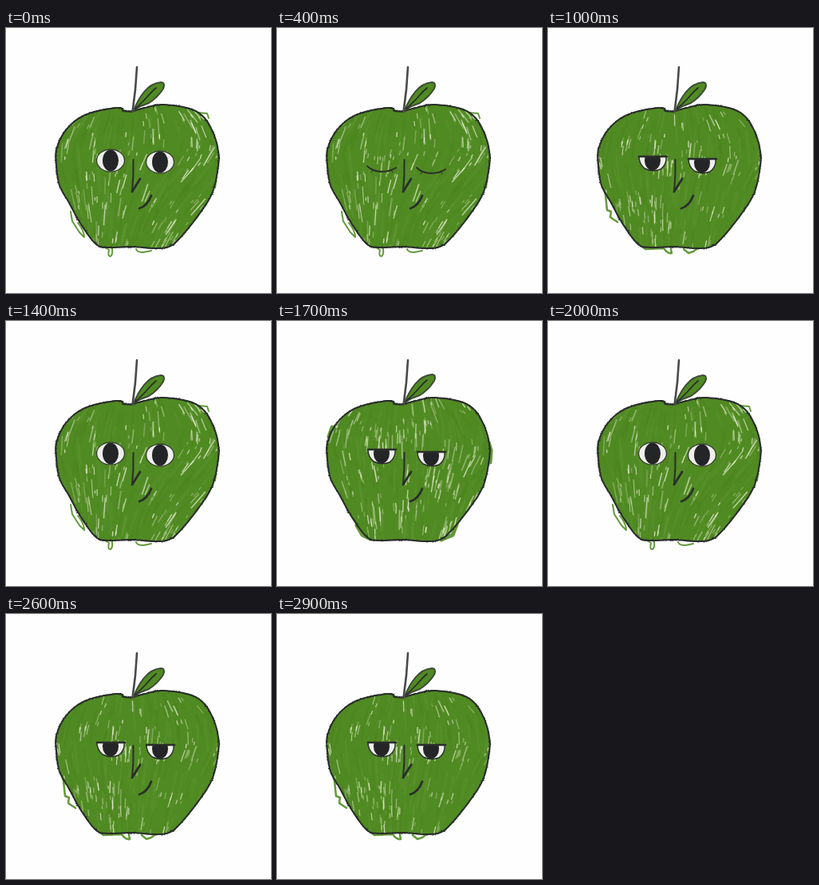
An HTML page with a canvas for the animation above (3000 ms loop, 332x332 px).

```html
<!DOCTYPE html>
<html lang="en">
<head>
<meta charset="utf-8">
<title>Blinking apple</title>
<style>
html, body { margin: 0; width: 100%; height: 100%; overflow: hidden; background: #fefefe; }
canvas { display: block; width: 332px; height: 332px; }
</style>
</head>
<body>
<canvas id="stage" width="332" height="332"></canvas>
<script>
const ctx = document.getElementById('stage').getContext('2d');
const INK = '#2a2e2b', GREEN = '#508a22', WHITE = '#efefec', PUPIL = '#242527';
const STEP = 100, LOOP = 3000;

// Fill drawing (A, B, C) and eyes (O open, H half, C closed) for each 100 ms step
const POSES = ('AO AO AO CH AC BH BH AC CH AC BH AO CH BH AO ' +
  'CH AC CH BH BH AO CH AC BH CH AC BH AO AC BH').split(' ');

const BODY = [[158,104],[149,104],[142,100],[124,102],[104,107],[87,116],[72,132],[63,153],
  [63,172],[67,197],[79,219],[94,246],[112,270],[127,275],[158,274],[184,276],
  [204,274],[219,262],[243,232],[259,205],[266,172],[266,155],[261,135],
  [249,113],[230,101],[196,96],[174,100]];

// lean: sideways slope of the crayon marks in the lower half
const FILLS = {
  A: { seed: 11, count: 65, long: 24, lean: x => (x - 118) / 135, tail: 2, tails: [
    'M81 230L83 242L92 256L98 262Q98 254 90 244',
    'M124 275L129 278Q127 286 131 286Q134 284 133 276',
    'M163 277Q164 281 172 281L182 279', 'M240 106L252 107L254 113', 'M266 170L262 200'] },
  B: { seed: 37, count: 65, long: 16, lean: x => .05 + (x - 150) / 270, tail: 2.5, tails: [
    'M82 126L70 135L75 134L68 150', 'M66 188L72 209L74 228L79 230L78 237L87 243',
    'M116 272L122 277L145 276Q150 283 155 282L154 277', 'M170 277L176 282L182 280L186 277'] },
  C: { seed: 73, count: 85, long: 22, lean: x => (x - 150) / 230, tail: 5, tails: [
    'M265 152L268 162L267 177', 'M100 256L107 268L117 273',
    'M206 274L220 268L225 255', 'M69 133L65 145'] }
};

function random(seed) {
  return () => {
    seed = (seed + 0x6D2B79F5) | 0;
    let t = Math.imul(seed ^ seed >>> 15, 1 | seed);
    t = t + Math.imul(t ^ t >>> 7, 61 | t) ^ t;
    return ((t ^ t >>> 14) >>> 0) / 4294967296;
  };
}

// Closed Catmull-Rom curve, sampled
function curve(points, steps = 12) {
  const n = points.length, out = [];
  points.forEach((b, i) => {
    const a = points[(i + n - 1) % n], c = points[(i + 1) % n], d = points[(i + 2) % n];
    for (let k = 0; k < steps; k++) {
      const t = k / steps;
      out.push([0, 1].map(j => b[j] + .5 * t * (c[j] - a[j] +
        t * (2 * a[j] - 5 * b[j] + 4 * c[j] - d[j] + t * (3 * (b[j] - c[j]) + d[j] - a[j])))));
    }
  });
  return out;
}

const edge = curve(BODY);
const body = new Path2D('M' + edge.map(p => p.join(' ')).join('L') + 'Z');

function line(d, width = 2, color = INK) {
  ctx.strokeStyle = color;
  ctx.lineWidth = width;
  ctx.stroke(typeof d === 'string' ? new Path2D(d) : d);
}

function shape(d, color) {
  ctx.fillStyle = color;
  ctx.fill(typeof d === 'string' ? new Path2D(d) : d);
}

function oval(x, y, rx, ry, color) {
  ctx.beginPath();
  ctx.ellipse(x, y, rx, ry, 0, 0, Math.PI * 2);
  ctx.fillStyle = color;
  ctx.fill();
}

function drawFill({ seed, count, long, lean, tail, tails }) {
  const rnd = random(seed);
  const mark = (x, y, len, width, color) => {
    // Marks follow the lobes at the top and the hatching below
    const low = Math.min(1, Math.max(0, (y - 115) / 60));
    const a = Math.atan((160 - x) / 100 * (1 - low) + lean(x) * low) + (rnd() - .5) * .2;
    const dx = Math.sin(a) * len, dy = -Math.cos(a) * len;
    line(`M${x - dx / 2} ${y - dy / 2}q${dx / 2 + rnd() - .5} ${dy / 2} ${dx} ${dy}`, width, color);
  };
  const spot = () => [62 + rnd() * 206, 102 + rnd() * 172];
  tails.forEach(d => line(d, tail, '#639a3a'));
  shape(body, GREEN);
  ctx.save();
  ctx.clip(body);
  for (let i = 0; i < 160; i++) {
    mark(...spot(), 12 + rnd() * 28, 3, i % 2 ? 'rgba(66,122,24,.18)' : 'rgba(112,160,70,.16)');
  }
  for (let i = 0; i < count; i++) {
    const [x, y] = spot();
    for (let k = 0; k < 3; k++) {
      const strong = rnd(), len = 3 + rnd() ** 2 * long;
      const mx = x + (rnd() - .5) * 14, my = y + (rnd() - .5) * 18;
      mark(mx, my, len, 1.8, 'rgba(214,228,186,.18)');
      mark(mx, my, len, .6 + strong * .7, `rgba(240,246,222,${.2 + strong * .5})`);
    }
  }
  ctx.restore();
}

// Grainy ink edge over a solid line
function drawOutline() {
  line(body, 2);
  const rnd = random(5);
  for (const [x, y] of edge) {
    const r = .5 + rnd() * .6;
    oval(x + (rnd() - .5) * 2, y + (rnd() - .5) * 2, r, r, INK);
  }
}

function drawLeaf(fill) {
  ctx.save();
  if (fill === 'C') ctx.translate(0, -1);
  const leaf = 'M160 103Q165 90 173 80Q182 69 194 68Q200 68 197 76Q190 87 179 94Q169 97 160 103Z';
  shape(leaf, GREEN);
  line(leaf, 2, '#3d4a36');
  line('M162 101Q172 92 178 85Q183 79 188 75', 1.8);
  ctx.restore();
  line('M164 49L162 77L158.5 105', 2.6, '#484a49');
}

function openEye(x, y) {
  oval(x, y, 18, 14.5, '#30352e');
  oval(x, y, 16.8, 13.3, WHITE);
  oval(x, y, 10, 13.5, PUPIL);
}

function halfEye(x, y) {
  const eye = `M${x - 17} ${y}Q${x - 17} ${y + 9} ${x - 10} ${y + 15}Q${x} ${y + 20} ${x + 10} ${y + 16}Q${x + 18} ${y + 10} ${x + 17} ${y}Z`;
  shape(eye, WHITE);
  ctx.save();
  ctx.clip(new Path2D(eye));
  oval(x, y + 5, 10, 12.5, PUPIL);
  ctx.restore();
  line(eye, 1.4);
  line(`M${x - 17} ${y}L${x + 18} ${y}`, 2.6);
}

function closedEye(x, y) {
  line(`M${x - 18} ${y - 7}Q${x - 11} ${y} ${x} ${y}Q${x + 11} ${y} ${x + 18} ${y - 5}`, 1.8);
  line(`M${x - 11} ${y - 2}l-2 3M${x + 12} ${y - 2}l2 3`, 1);
}

const EYES = {
  O() { openEye(131, 166); openEye(193, 168); },
  H() { halfEye(131, 161); halfEye(193, 164); },
  C() { closedEye(131, 180); closedEye(193, 182); }
};

function draw([fill, eyes]) {
  shape('M0 0H332V332H0Z', '#fefefe');
  ctx.lineCap = ctx.lineJoin = 'round';
  drawFill(FILLS[fill]);
  drawOutline();
  drawLeaf(fill);
  EYES[eyes]();
  line('M159.5 165Q160 185 158 205', 2);
  line('M158 205Q163 197 168 189', 2.8);
  line('M167 226Q177 223 182 210', 2.7);
}

const start = performance.now();
let shown = '';
function tick() {
  const t = Math.max(0, performance.now() - start) % LOOP;
  const pose = POSES[Math.floor(t / STEP)];
  if (pose !== shown) draw(shown = pose);
  requestAnimationFrame(tick);
}
tick();
</script>
</body>
</html>
```
